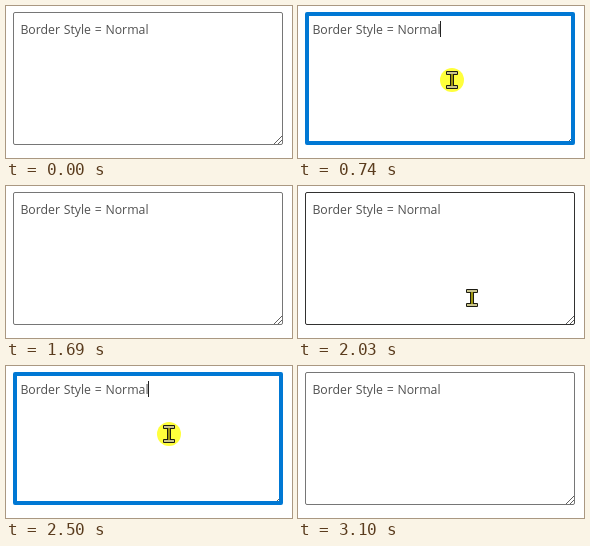
These frames come from a looping animation (286x152 px, 3980 ms). An HTML page:

```html
<!DOCTYPE html>
<html lang="en">
<head>
<meta charset="utf-8">
<title>Border style</title>
<style>
  html, body { margin: 0; width: 100%; height: 100%; overflow: hidden; background: #fff; }
  .stage { position: relative; width: 286px; height: 152px; overflow: hidden; }
  .stage > * { position: absolute; animation: 3980ms step-end infinite; }

  .text {
    left: 14.4px; top: 15px; line-height: 18px; white-space: pre;
    font-family: "Open Sans", "Noto Sans", sans-serif;
    font-size: 12.3px; word-spacing: .5px; color: #505050;
  }
  .grip { left: 0; top: 0; }
  .field {
    left: 7px; top: 6px; width: 270px; height: 133px; box-sizing: border-box;
    border: 1px solid #767676; border-radius: 2px; animation-name: field;
  }
  .caret { left: 142px; top: 15px; width: 1px; height: 16px; background: #222; animation-name: caret; }
  .pointer { left: -12px; top: -12px; animation-name: pointer; }
  .halo { animation: halo 3980ms step-end infinite; }

  /* hover, focus, blur; then the same again */
  @keyframes field {
    0%, 42.462%, 77.889%, 100% { border: 1px solid #767676; }
    13.317%, 51.005% { border: 1px solid #323130; }
    18.593%, 62.814% { border: 4px solid #0078d4; }
  }
  @keyframes caret {
    0%, 32.412%, 76.131%, 100% { opacity: 0; }
    18.593%, 62.814% { opacity: 1; }
  }
  @keyframes halo {
    0%, 23.618%, 67.588%, 100% { opacity: 0; }
    18.593%, 62.814% { opacity: 1; }
  }
  @keyframes pointer {
    0%, 30.402%, 71.106%, 100% { opacity: 0; transform: translate(163px, 112px); }
    13.317% { opacity: 1; transform: translate(163px, 112px); }
    15.075% { opacity: 1; transform: translate(157px, 84px); }
    16.834%, 18.593%, 23.618% { opacity: 1; transform: translate(154px, 74px); }
    49.246% { opacity: 1; transform: translate(183px, 147px); }
    51.005% { opacity: 1; transform: translate(174px, 112px); }
    52.764% { opacity: 1; transform: translate(166px, 84px); }
    54.523% { opacity: 1; transform: translate(163px, 72px); }
    56.281%, 62.814% { opacity: 1; transform: translate(163px, 68px); }
    67.588% { opacity: 1; transform: translate(165px, 76px); }
    69.347% { opacity: 1; transform: translate(177px, 109px); }
  }
</style>
</head>
<body>
<div class="stage">
  <div class="text">Border Style = Normal</div>
  <svg class="grip" width="286" height="152" fill="none" stroke="#505050" stroke-width=".9">
    <path d="M268 138 276 130M272 138 276 134"/>
  </svg>
  <div class="field"></div>
  <div class="caret"></div>
  <svg class="pointer" width="24" height="24" viewBox="-12 -12 24 24">
    <circle class="halo" r="12" fill="#ffff3c"/>
    <g stroke="#1c1b12">
      <path d="M-1.5-7.5h3v15h-3z" fill="#9c9410"/>
      <path d="M-5.5-8.5h11v3h-11zM-5.5 5.5h11v3h-11z" fill="#c9c48c"/>
    </g>
    <path d="M-1-6h2v12h-2z" fill="#9c9410"/>
  </svg>
</div>
</body>
</html>
```
